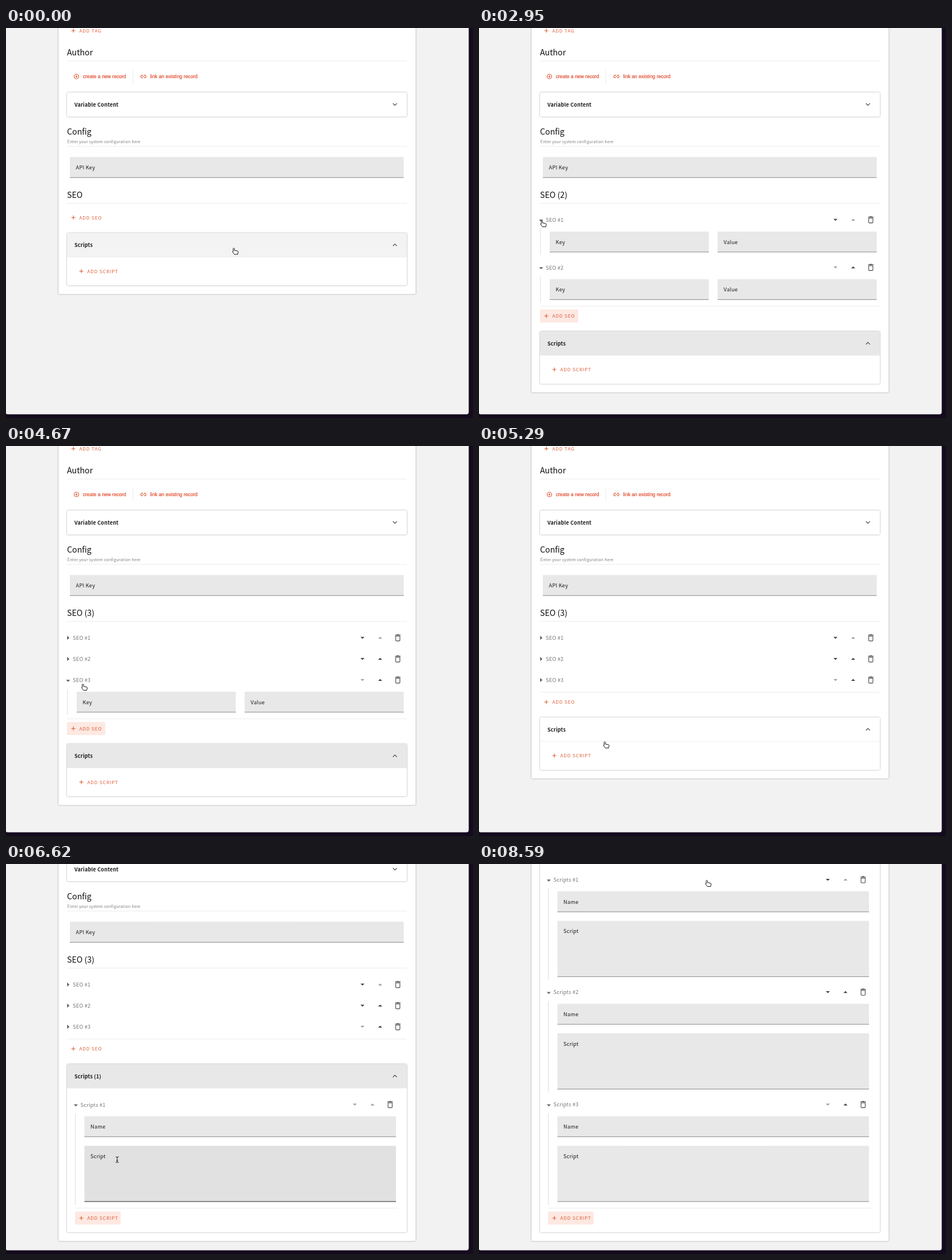
Recreate the animation shown at these times as an HTML page. Size 819x684 px, loop 8.65 s.

```html
<!DOCTYPE html>
<html lang="en">
<head>
<meta charset="utf-8">
<title>Form editor</title>
<style>
html, body { margin: 0; width: 819px; height: 684px; overflow: hidden; background: #150a1f; }
svg { display: block; }
text { font-family: "Noto Sans CJK JP", "Noto Sans CJK SC", "Noto Sans", sans-serif; fill: #1c1c1c; }
.head { font-size: 14.2px; fill: #111; }
.note { font-size: 6.9px; letter-spacing: .28px; fill: #7b7b7b; }
.label { font-size: 9.2px; letter-spacing: .25px; }
.item { font-size: 9.2px; letter-spacing: .25px; fill: #767676; }
.title { font-size: 9px; letter-spacing: .2px; font-weight: 700; }
.add { font-size: 8.2px; letter-spacing: .88px; font-weight: 500; fill: #de5f3b; }
.link { font: 8.6px "Liberation Sans", Arial, sans-serif; fill: #e0492a; stroke: #e0492a; stroke-width: .2px; }
.icon { fill: none; stroke: #de5833; stroke-width: 1.1px; }
.chev { fill: none; stroke: #444; stroke-width: 1.2px; }
.rule { fill: #ececec; }
.sheet { fill: #fff; filter: drop-shadow(0 .8px 1px rgba(0, 0, 0, .42)); }
</style>
</head>
<body>
<script>
const LOOP = 8650, ROW = 37, OPEN = 83.5, SCRIPT = 197.2;
const NS = 'http://www.w3.org/2000/svg';

function el(name, attrs, parent, text) {
  const node = document.createElementNS(NS, name);
  for (const key in attrs) node.setAttribute(key, attrs[key]);
  if (text) node.textContent = text;
  if (parent) parent.appendChild(node);
  return node;
}
const group = parent => el('g', {}, parent);
const rect = (parent, x, y, width, height, attrs) =>
  el('rect', { x, y, width, height, ...attrs }, parent);
const text = (parent, cls, x, y, value) => el('text', { class: cls, x, y }, parent, value);
const path = (parent, d, attrs) => el('path', { d, ...attrs }, parent);
const rule = (parent, x, y, w) => rect(parent, x, y, w, 1, { class: 'rule' });
const show = (node, on) => node.setAttribute('display', on ? 'inline' : 'none');
const move = (node, y) => node.setAttribute('transform', `translate(0 ${y})`);

const svg = el('svg', { width: 819, height: 684, viewBox: '0 0 819 684' }, document.body);
const clip = el('clipPath', { id: 'window' }, el('defs', {}, svg));
const frame = 'M0 0H811.5V673.5Q811.5 677.5 807.5 677.5H3Q1 677.5 0 676Z';
path(clip, frame);
path(svg, frame, { fill: '#f2f2f2' });
const view = el('g', { 'clip-path': 'url(#window)' }, svg);
const page = group(view);
const card = rect(page, 92, -100, 626.5, 566, { rx: 2, class: 'sheet' });

const fields = [];
const root = { y: 0, on: true, node: page };

function field(owner, x, y, w, h, label) {
  const box = rect(owner.node, x, y, w, h, { rx: 1 });
  const line = rect(owner.node, x, y + h - 1, w, 1);
  text(owner.node, 'label', x + 10.6, y + 21.7, label);
  fields.push({ owner, x, y, w, h, box, line });
}

function button(parent, x, w, label) {
  const node = group(parent);
  const back = rect(node, x, -11.5, w, 23, { rx: 2, fill: '#fde8e2' });
  path(node, `M${x + 7.7} 0h6.8m-3.4 -3.4v6.8`, { class: 'icon' });
  text(node, 'add', x + 21.5, 3.1, label);
  return { node, back, x, w, y: 0 };
}

function item(parent, name, dx) {
  const node = group(parent), body = group(node);
  const it = { node: body, root: node, y: 0, on: false };
  it.shut = path(node, `M${107.3 + dx} -3.7l3.7 3.6l-3.7 3.6z`, { fill: '#555' });
  it.wide = path(node, `M${105.4 + dx} -.4h7l-3.5 3.7z`, { fill: '#666' });
  text(node, 'item', 117 + dx, 3.5, name);
  it.down = path(node, `M${621.7 - dx} -1.7h7l-3.5 3.5z`);
  it.up = path(node, `M${652.7 - dx} 1.5h7l-3.5 -3.5z`);
  path(node, `M${683.5 - dx} -3v7.3q0 1.1 1.1 1.1h5.1q1.1 0 1.1 -1.1v-7.3zM${682.4 - dx} -4.9h9.5m-6.4 -.9h3.3`,
    { fill: 'none', stroke: '#444', 'stroke-width': 1.1 });
  return it;
}

// Fixed upper part of the form
const addTag = button(page, 107, 67, 'ADD TAG');
move(addTag.node, 4.7);
show(addTag.back, false);
text(page, 'head', 107, 48.4, 'Author');
rule(page, 107, 57.5, 596);
el('circle', { cx: 123.5, cy: 85, r: 4, class: 'icon', 'stroke-width': .9 }, page);
path(page, 'M121.4 85h4.2m-2.1 -2.1v4.2', { class: 'icon' });
text(page, 'link', 134.7, 88, 'create a new record');
rect(page, 222, 73, 1, 25, { class: 'rule' });
path(page, 'M240 82.6h-1.2a2.3 2.3 0 0 0 0 4.7h1.2m2 -4.7h1.2a2.3 2.3 0 0 1 0 4.7h-1.2m-3 -2.3h4', { class: 'icon' });
text(page, 'link', 252.7, 88, 'link an existing record');
rect(page, 107, 113, 596, 42.5, { rx: 2, class: 'sheet' });
text(page, 'title', 120, 137.5, 'Variable Content');
path(page, 'M678.5 132.2l3.5 3.5l3.5 -3.5', { class: 'chev' });
text(page, 'head', 107, 187, 'Config');
text(page, 'note', 107.8, 202.2, 'Enter your system configuration here');
rule(page, 107, 207, 596);
field(root, 112, 226.3, 585.5, 36.5, 'API Key');
const seoHead = text(page, 'head', 107, 298.4, 'SEO');
rule(page, 107, 307, 596);

// Repeating entries
const seos = [1, 2, 3].map(n => {
  const it = item(page, 'SEO #' + n, 0);
  rect(it.node, 107.3, 15.5, 1, 46, { fill: '#dedede' });
  field(it, 124, 20.5, 279, 36.3, 'Key');
  field(it, 418.5, 20.5, 279, 36.3, 'Value');
  return it;
});
const seoRule = rule(page, 107, 0, 596);
const addSeo = button(page, 107, 67, 'ADD SEO');

const panel = group(page);
const sheet = rect(panel, 107, 0, 596, 92, { rx: 2, class: 'sheet' });
const header = rect(panel, 107, 0, 596, 42, { rx: 2 });
rule(panel, 107, 41.5, 596);
const panelHead = text(panel, 'title', 120, 24.5, 'Scripts');
path(panel, 'M678.5 22.8l3.5 -3.5l3.5 3.5', { class: 'chev' });
const scripts = [1, 2, 3].map(n => {
  const it = item(panel, 'Scripts #' + n, 13.5);
  rect(it.node, 121, 15.5, 1, 160.5, { fill: '#dedede' });
  field(it, 137.5, 20.5, 546.5, 36.3, 'Name');
  field(it, 137.5, 72.2, 546.5, 98.3, 'Script');
  return it;
});
const scriptRule = rule(panel, 121, 0, 567);
const addScript = button(panel, 121, 80, 'ADD SCRIPT');

const bar = rect(view, 805.3, -10, 5.4, 685, { rx: 2.5, fill: '#858585' });

// Pointers, drawn from their hot spot
const pointer = group(svg);
const shapes = { hand: group(pointer), beam: group(pointer), arrow: group(pointer) };
path(shapes.hand, 'M-1.1 1.3Q0 -.5 1.2 1.3V4.7L6 5.4Q8 5.8 7.6 8L6.7 11.5H1.2L-2 7.5Q-2.7 5.9 -1.1 6.5Z',
  { fill: '#fff', stroke: '#111', 'stroke-width': 1 });
path(shapes.beam, 'M-2.7 -5Q0 -5 0 -3.5V3.5Q0 5 -2.7 5M2.7 -5Q0 -5 0 -3.5M0 3.5Q0 5 2.7 5M-1.4 1.6h2.8',
  { fill: 'none', stroke: '#111', 'stroke-width': 1 });
path(shapes.arrow, 'M0 0V9.5L2.2 7.5L3.8 11L5.4 10.3L3.9 6.9H6.8Z',
  { fill: '#111', stroke: '#fff', 'stroke-width': .6 });

// Pointer route: time, x, y
const route = [
  [0, 399.5, 385.5], [50, 399.5, 385.5], [900, 151, 330], [1000, 150, 328], [1240, 150, 328],
  [1520, 273.5, 373], [1980, 150, 420], [2140, 150, 420], [2500, 230, 372], [2980, 109, 337],
  [3100, 109, 337], [3340, 110, 374], [3450, 110, 374], [3670, 147, 388.5], [3880, 148, 411],
  [4030, 148, 411], [4400, 225, 438], [4790, 109, 411], [4930, 109, 411], [5290, 220.5, 518],
  [5600, 160, 541], [5780, 160, 541], [6620, 195, 518.5], [6820, 160, 620], [6920, 160, 620],
  [7240, 256, 562.5], [7500, 160, 620], [7680, 160, 620], [8190, 235, 560], [8380, 235, 560],
  [8590, 399.5, 28], [LOOP, 399.5, 28]
];
const scrolls = [[5800, 6040, 125], [6960, 7180, SCRIPT], [7760, 8000, SCRIPT]];

const clamp = v => Math.max(0, Math.min(1, v));
const ease = v => (v = clamp(v), v * v * (3 - 2 * v));
const count = (t, times) => times.filter(at => t >= at).length;
const within = (t, a, b) => t >= a && t < b;

function slope(i, k) {
  const a = route[i - 1], b = route[i], c = route[i + 1];
  if (!a || !c || (b[k] - a[k]) * (c[k] - b[k]) <= 0) return 0;
  return (c[k] - a[k]) / (c[0] - a[0]);
}

function position(t) {
  let i = 0;
  while (i < route.length - 2 && t >= route[i + 1][0]) i++;
  const a = route[i], b = route[i + 1], span = b[0] - a[0];
  const u = clamp((t - a[0]) / span), v = 1 - u;
  return [1, 2].map(k =>
    a[k] * (1 + 2 * u) * v * v + b[k] * u * u * (3 - 2 * u) +
    span * u * v * (slope(i, k) * v - slope(i + 1, k) * u));
}

function place(items, n, isOpen, start, shutSize, openSize) {
  let y = start;
  items.forEach((it, i) => {
    const on = i < n, open = on && isOpen(i);
    show(it.root, on);
    it.on = open;
    if (!on) return;
    move(it.root, y);
    it.y = y;
    show(it.node, open);
    show(it.wide, open);
    show(it.shut, !open);
    it.down.setAttribute('fill', i < n - 1 ? '#444' : '#a0a0a0');
    it.up.setAttribute('fill', i > 0 ? '#444' : '#a0a0a0');
    y += open ? openSize : shutSize;
  });
  return y;
}

function headerFill(t) {
  if (within(t, 5000, 5700)) return '#fff';
  const c = Math.round(243 - 11 * clamp((t - 50) / 150));
  return `rgb(${c},${c},${c})`;
}

function render(t) {
  const seoCount = count(t, [1240, 2060, 4000]);
  const scriptCount = count(t, [5700, 6900, 7640]);
  const closed = [3070, 3400, 4900];
  const end = place(seos, seoCount, i => t < closed[i], 336.5, ROW, OPEN);
  addSeo.y = seoCount ? end + 1.5 : 332.5;
  move(addSeo.node, addSeo.y);
  show(seoRule, seoCount);
  seoRule.setAttribute('y', addSeo.y - 17.5);
  seoHead.textContent = 'SEO' + (seoCount ? ` (${seoCount})` : '');

  const top = addSeo.y + 27, extra = scriptCount ? 203 + SCRIPT * (scriptCount - 1) : 0;
  move(panel, top);
  place(scripts, scriptCount, () => true, 71, SCRIPT, SCRIPT);
  scripts.forEach(it => it.y += top);
  addScript.y = top + 67 + extra;
  move(addScript.node, 67 + extra);
  show(scriptRule, scriptCount);
  scriptRule.setAttribute('y', 49 + extra);
  sheet.setAttribute('height', 92 + extra);
  card.setAttribute('height', top + extra + 207.2);
  header.setAttribute('fill', headerFill(t));
  panelHead.textContent = 'Scripts' + (scriptCount ? ` (${scriptCount})` : '');

  let scroll = 0, shade = 0;
  for (const [a, b, size] of scrolls) {
    scroll += size * ease((t - a) / (b - a));
    if (t >= a) shade = 1 - clamp((t - b - 380) / 190);
  }
  move(page, -scroll);
  bar.setAttribute('opacity', shade);

  const [x, sy] = position(t), y = sy + scroll;
  let kind = 'arrow';
  for (const f of fields) {
    const fy = f.y + f.owner.y;
    const hot = f.owner.on && x > f.x && x < f.x + f.w && y > fy && y < fy + f.h;
    f.box.setAttribute('fill', hot ? '#e1e1e1' : '#e8e8e8');
    f.line.setAttribute('fill', hot ? '#2a2a2a' : '#8c8c8c');
    if (hot) kind = 'beam';
  }
  const over = b => x > b.x && x < b.x + b.w && Math.abs(y - b.y) < 11.5;
  const rows = [...seos.slice(0, seoCount), ...scripts.slice(0, scriptCount)];
  if (over(addSeo) || over(addScript) || (y > top && y < top + 43) ||
      rows.some(it => Math.abs(y - it.y) < 13)) kind = 'hand';
  const seoFocus = within(t, 1240, 3070) || within(t, 4000, 4900);
  addSeo.back.setAttribute('opacity', seoFocus ? 1 : over(addSeo) ? .5 : 0);
  addScript.back.setAttribute('opacity', scriptCount ? 1 : over(addScript) ? .5 : 0);

  for (const name in shapes) show(shapes[name], name === kind);
  pointer.setAttribute('transform', `translate(${x} ${sy})`);
}

const begin = performance.now();
function tick() {
  render((performance.now() - begin) % LOOP);
  requestAnimationFrame(tick);
}
tick();
</script>
</body>
</html>
```
